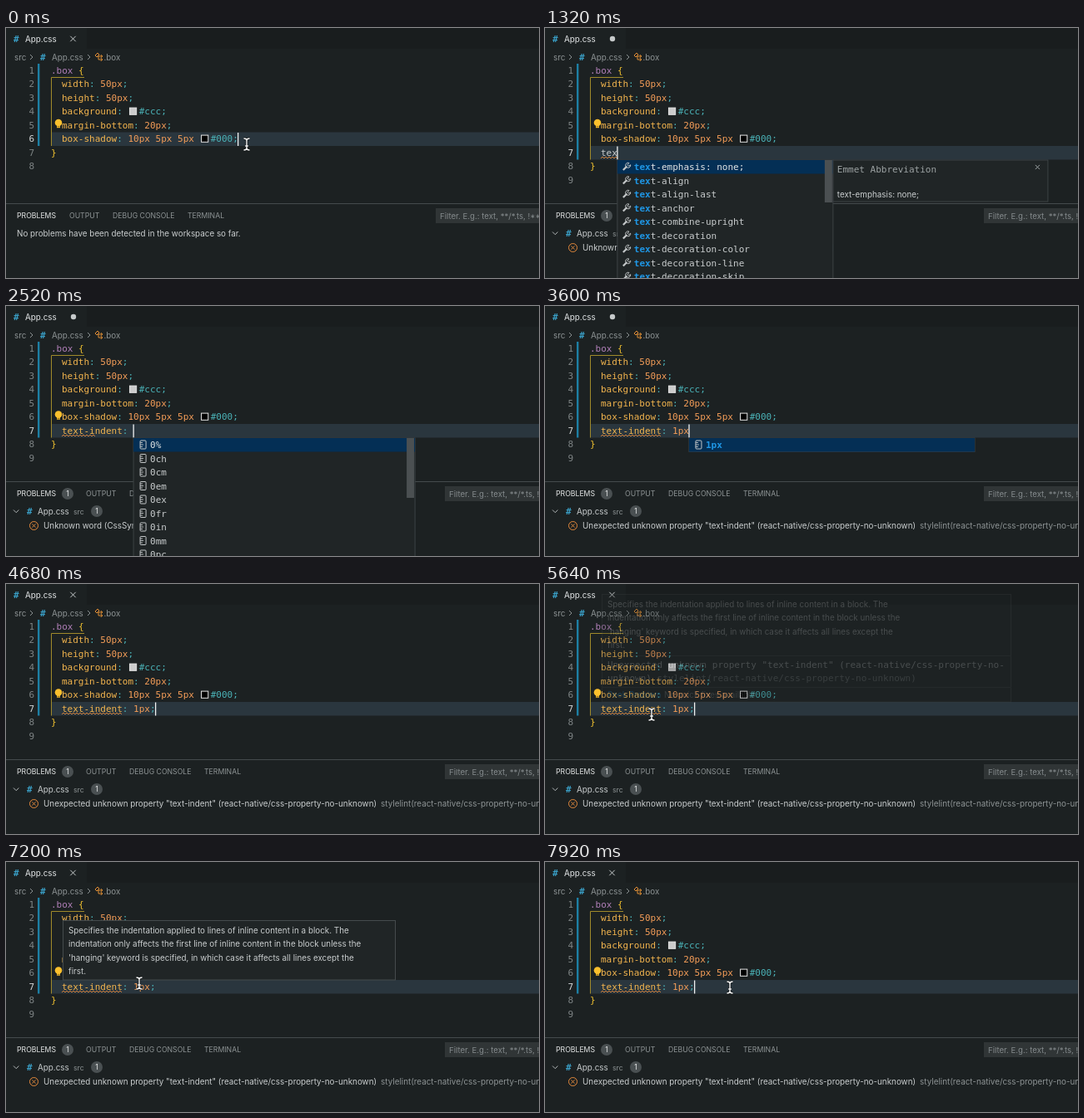
Animation of 640x301 px, one loop 8000 ms. Source, as an HTML page:

```html
<!DOCTYPE html>
<html lang="en">
<head>
<meta charset="utf-8">
<title>Editor</title>
<style>
  html, body { margin: 0; width: 100%; height: 100%; overflow: hidden; background: #1c2122; }
  svg { display: block; width: 100%; height: 100%; }
  text { white-space: pre; }
  .m { font: 11px "DejaVu Sans Mono", monospace; }
  .s { font: 9.85px Inter, sans-serif; }
  .p { font: 8.7px Inter, sans-serif; }
  .b { font-weight: 700; }
</style>
</head>
<body>
<svg id="stage" viewBox="0 0 640 301"></svg>
<script>
(() => {
const stage = document.getElementById('stage');
const LOOP = 8000, CH = 6.622, ROW = 16.5, LEFT = 67;
const C = {
  bg: '#1c2122', prop: '#f3b54e', punct: '#4bb3b8', num: '#f49d58', sel: '#b07fb8',
  brace: '#f2c230', text: '#c9cdce', dim: '#8d9394', blue: '#1f97e6', icon: '#3a9fc6', warn: '#e58a3c'
};

const esc = s => s.replace(/&/g, '&amp;').replace(/</g, '&lt;');
const text = (x, y, s, fill = C.text, cls = 's', more = '') =>
  `<text x="${x}" y="${y}" fill="${fill}" class="${cls}" ${more}>${esc(s)}</text>`;
const rect = (x, y, w, h, fill, more = '') =>
  `<rect x="${x}" y="${y}" width="${w}" height="${h}" fill="${fill}" ${more}/>`;
const path = (d, stroke, w = 1, more = '') =>
  `<path d="${d}" fill="none" stroke="${stroke}" stroke-width="${w}" ${more}/>`;
const circle = (x, y, r, fill, more = '') => `<circle cx="${x}" cy="${y}" r="${r}" fill="${fill}" ${more}/>`;
const cross = (x, y, r, color) =>
  path(`M${x - r} ${y - r}l${2 * r} ${2 * r}m0 ${-2 * r}l${-2 * r} ${2 * r}`, color, 1);
const chevron = (x, y) => path(`M${x} ${y - 3}l3 3l-3 3`, C.dim, 1);
const rowTop = i => 43 + ROW * i;
const baseline = i => 54.8 + ROW * i;

// Typed content of the new line, by time
const typed = [
  [360, ''], [720, 't'], [960, 'te'], [1200, 'tex'], [1440, 'text'], [1620, 'text-'], [1800, 'text-i'],
  [2160, 'text-indent: '], [2880, 'text-indent: 1'], [3120, 'text-indent: 1p'],
  [3360, 'text-indent: 1px'], [3640, 'text-indent: 1px;']
];
const typedAt = t => typed.reduce((s, [at, v]) => t >= at ? v : s, null);

const props = ['emphasis: none;', 'align', 'align-last', 'anchor', 'combine-upright', 'decoration',
  'decoration-color', 'decoration-line', 'decoration-skip'].map(s => 'text-' + s);
const units = ['%', 'ch', 'cm', 'em', 'ex', 'fr', 'in', 'mm', 'pc'];

function tokens(x, y, parts) {
  return parts.map(([s, color]) => {
    const out = text(x, y, s, color, 'm');
    x += s.length * CH;
    return out;
  }).join('');
}

function declaration(i, s) {
  const cut = s.indexOf(':');
  if (cut < 0) return text(LEFT, baseline(i), s, C.text, 'm');
  const end = s.endsWith(';') ? ';' : '';
  const value = s.slice(cut + 1, s.length - end.length);
  return tokens(LEFT, baseline(i), [[s.slice(0, cut), C.prop], [':', C.punct], [value, C.num], [end, C.punct]]);
}

function swatch(i, lead, color) {
  const x = LEFT + lead * CH, y = rowTop(i) + 3.6;
  return rect(x + 2, y, 8.2, 8.2, color, 'stroke="#e4e4e4" stroke-width="1"') +
    tokens(x + 13.2, baseline(i), [[color + ';', C.punct]]);
}

function header(dirty) {
  return rect(97, 0, 543, 25, '#191d1e') +
    text(9, 17, '#', C.icon, 'm b') + text(23, 16.6, 'App.css', '#e4e7e8') +
    (dirty ? circle(81, 13, 3.2, '#c6cacb') : cross(80.5, 13, 3.2, '#c6cacb')) +
    text(10, 38.5, 'src', C.dim) + chevron(29, 35) + text(41, 39, '#', C.icon, 'm b') +
    text(55, 38.5, 'App.css', C.dim) + chevron(98, 35) +
    path('M107 33l3 -3l2 2l-3 3zM110 34h3M111 34v4h2M114 32.5l2 1.5l-2 1.5zM114 36.5l2 1.5l-2 1.5z', '#dc8d35', 1) +
    text(117.5, 38.5, '.box', C.dim);
}

function code(line) {
  const added = line !== null, now = added ? 6 : 5, rows = added ? 9 : 8;
  let out = rect(54, rowTop(now), 586, ROW, '#2a363e');
  for (let i = 0; i < rows; i++)
    out += text(34, baseline(i), String(i + 1), i === now ? '#d4d7d8' : '#7f8586', 'm', 'text-anchor="end"');
  out += rect(38, rowTop(0), 2.4, ROW * (now + 1), '#1d7fa3');
  out += path(`M94 59.5H54.5V${rowTop(now + 1)}`, '#a08a2b');
  out += tokens(54, baseline(0), [['.box', C.sel], [' {', C.brace]]);
  out += declaration(1, 'width: 50px;') + declaration(2, 'height: 50px;');
  out += declaration(3, 'background: ') + swatch(3, 12, '#ccc');
  out += declaration(4, 'margin-bottom: 20px;');
  out += declaration(5, 'box-shadow: 10px 5px 5px ') + swatch(5, 25, '#000');
  if (added) out += declaration(6, line);
  return out + text(54, baseline(now + 1), '}', C.brace, 'm');
}

function squiggle(n) {
  let d = `M${LEFT} 157`;
  for (let x = 0, k = 0; x < n * CH - 1; x += 2, k++) d += `l2 ${k % 2 ? 2 : -2}`;
  return path(d, C.warn, 0.9);
}

function bulb(i) {
  const y = 48.6 + ROW * i;
  return circle(63, y - 0.6, 4.3, '#fbc02d') + rect(61, y + 2, 4, 3.6, '#fbc02d') +
    rect(61.4, y + 3.8, 3.2, 0.7, '#6d5517');
}

const badge = (x, y) => circle(x, y, 7, '#4a5052') +
  text(x, y + 3, '1', '#e6e8e8', 'p', 'text-anchor="middle"');

function panel(problem) {
  const dx = problem ? 20 : 0, fx = problem ? 527 : 516;
  let out = rect(0, 211, 640, 90, C.bg) + rect(0, 211, 640, 1, '#454b4d') +
    text(13, 229.2, 'PROBLEMS', '#e6e8e8', 'p') + text(76 + dx, 229.2, 'OUTPUT', C.dim, 'p') +
    text(128 + dx, 229.2, 'DEBUG CONSOLE', C.dim, 'p') + text(218 + dx, 229.2, 'TERMINAL', C.dim, 'p') +
    rect(fx, 217, 130, 18, '#303536') +
    text(fx + 5, 229.5, 'Filter. E.g.: text, **/*.ts, !**/node_modules/**', '#858b8d', 's', 'style="font-size:9.6px"');
  if (!problem) return out + text(13, 251, 'No problems have been detected in the workspace so far.');
  const [msg, rule, pos] = problem;
  return out + badge(74, 226) + path('M9 245.5l3.2 3.2l3.2 -3.2', '#b4b9ba') +
    text(25, 251, '#', C.icon, 'm b') + text(38, 250.6, 'App.css') + text(81, 250.6, 'src', C.dim, 'p') +
    badge(109, 247) + circle(33.5, 264.5, 5, 'none', `stroke="${C.warn}"`) + cross(33.5, 264.5, 2, C.warn) +
    `<text x="45" y="268" class="s" fill="${C.text}">${msg}<tspan dx="5" fill="${C.dim}">${rule}</tspan>` +
    `<tspan dx="5" fill="${C.dim}">${pos}</tspan></text>`;
}

const wrench = (x, y) => path(`M${x - 4} ${y + 4}l4.5 -4.5`, '#c3c7c8', 2.2) +
  path(`M${x + 3} ${y - 4.5}a3 3 0 1 0 1.8 2.2l-2 1.6l-1.6 -1.6z`, '#c3c7c8');
const ruler = (x, y) => rect(x - 3, y - 5, 7, 10, 'none', 'rx="1" stroke="#c3c7c8"') +
  path(`M${x - 3} ${y - 2.5}h3m-3 2.5h4m-4 2.5h3`, '#c3c7c8', 0.9);

function suggestions(line) {
  if (!line || line.endsWith(';')) return '';
  const cut = line.indexOf(': '), value = cut >= 0;
  const word = value ? line.slice(cut + 2) : line;
  let items = props;
  if (word === 'text-i') items = ['text-indent', ...props.slice(1)];
  if (value) items = word.length < 2 ? units.map(u => (word || '0') + u)
    : word === '1p' ? ['1pc', '1pt', '1px'] : ['1px'];
  const x = LEFT + line.length * CH, w = value ? 338 + (word ? 5 : 0) : 259;
  const full = items.length > 5, h = full ? 160 : items.length * ROW;
  let out = rect(x, 159, w, h, '#202526', 'stroke="#3d4345" stroke-width="1"') + rect(x, 159, w, ROW, '#042f55');
  if (full) out += rect(x + w - 10, 159, 9, value ? 72 : 51, '#4b5052');
  items.forEach((s, i) => {
    const y = 167 + ROW * i, n = s.startsWith(word) ? word.length : 0;
    out += (value ? ruler : wrench)(x + 11, y) +
      text(x + 20, y + 4, s.slice(0, n), C.blue, 'm b') +
      text(x + 20 + n * CH, y + 4, s.slice(n), i ? C.text : '#e2e5e6', 'm');
  });
  if (!value && line.length < 5) {
    const d = x + w;
    out += rect(d, 159, 258, 50, '#202526', 'stroke="#3d4345" stroke-width="1"') +
      text(d + 5, 174, 'Emmet Abbreviation', '#9ca2a3', 'm') + cross(d + 245.5, 167.5, 2.6, '#9ca2a3') +
      text(d + 5, 203.5, 'text-emphasis: none;');
  }
  return out;
}

const help = ['Specifies the indentation applied to lines of inline content in a block. The',
  'indentation only affects the first line of inline content in the block unless the',
  "'hanging' keyword is specified, in which case it affects all lines except the", 'first.'];

function hover(withError, alpha) {
  const y = withError ? 12.5 : 70.5, w = withError ? 491 : 399;
  let out = rect(68.5, y, w, 142 - y, '#202526', 'stroke="#454b4d"');
  help.forEach((s, i) => out += text(75, y + 15.2 + ROW * i, s));
  if (withError) out += path('M68.5 86.5h491M68.5 124.5h491', '#3d4345') +
    text(75, 100.8, 'Unexpected unknown property "text-indent" (react-native/css-property-no-', C.text, 'm') +
    tokens(75, 117, [['unknown) ', C.text], ['stylelint(react-native/css-property-no-unknown)', C.dim]]) +
    text(75, 137, 'Peek Problem', C.blue) + text(143, 137, 'No quick fixes available', C.dim);
  return `<g opacity="${alpha}">${out}</g>`;
}

const stops = [[4700, 289, 140], [5200, 128, 157], [6500, 128, 157], [6900, 160, 146], [7350, 160, 146], [7800, 222, 151]];
function pointer(t) {
  if (t >= 360 && t < 4700) return '';
  let [, x, y] = stops[0];
  for (let i = 1; i < stops.length; i++) {
    const [a, x0, y0] = stops[i - 1], [b, x1, y1] = stops[i];
    if (t < a) break;
    const k = Math.min(1, (t - a) / (b - a)), e = k * k * (3 - 2 * k);
    x = x0 + (x1 - x0) * e;
    y = y0 + (y1 - y0) * e;
  }
  const d = `M${x - 3.5} ${y - 7}q3.5 0 3.5 2.5q0 -2.5 3.5 -2.5M${x} ${y - 4.5}v9` +
    `M${x - 3.5} ${y + 7}q3.5 0 3.5 -2.5q0 2.5 3.5 2.5M${x - 1.8} ${y + 2}h3.6`;
  return path(d, '#101314', 2.8) + path(d, '#f4f5f5', 1.4);
}

function caret(t, line) {
  if (t >= 3640 && Math.floor((t - 3640) / 500) % 2) return '';
  return line === null ? rect(278, 126, 1.3, 16, '#f0f1f1')
    : rect(LEFT + line.length * CH - 0.6, 142.5, 1.3, 16, '#f0f1f1');
}

function draw(t) {
  const line = typedAt(t);
  let problem = null, wave = 0;
  if (t >= 1080) {
    problem = ['Unknown word (CssSyntaxError)', 'stylelint(CssSyntaxError)', '[7, 3]'];
    wave = Math.min(line.length, 6);
  }
  if (t >= 2760) {
    const rule = 'react-native/css-property-no-unknown';
    problem = [`Unexpected unknown property "text-indent" (${rule})`, `stylelint(${rule})`, '[7, 3]'];
    wave = 11;
  }
  let out = rect(0, 0, 640, 301, C.bg) + header(t >= 360 && t < 4200) + code(line);
  if (wave) out += squiggle(wave);
  if (t < 1440) out += bulb(4);
  else if (t < 2700 || t >= 4400) out += bulb(5);
  out += caret(t, line) + panel(problem) + suggestions(line);
  const fade = from => Math.min(1, (t - from) / 100);
  if (t >= 5616 && t < 6600) out += hover(true, fade(5616));
  if (t >= 7000 && t < 7560) out += hover(false, fade(7000));
  return out + pointer(t);
}

let shown = '';
const start = performance.now();
function tick() {
  const next = draw((performance.now() - start) % LOOP);
  if (next !== shown) stage.innerHTML = shown = next;
  requestAnimationFrame(tick);
}
tick();
})();
</script>
</body>
</html>
```
